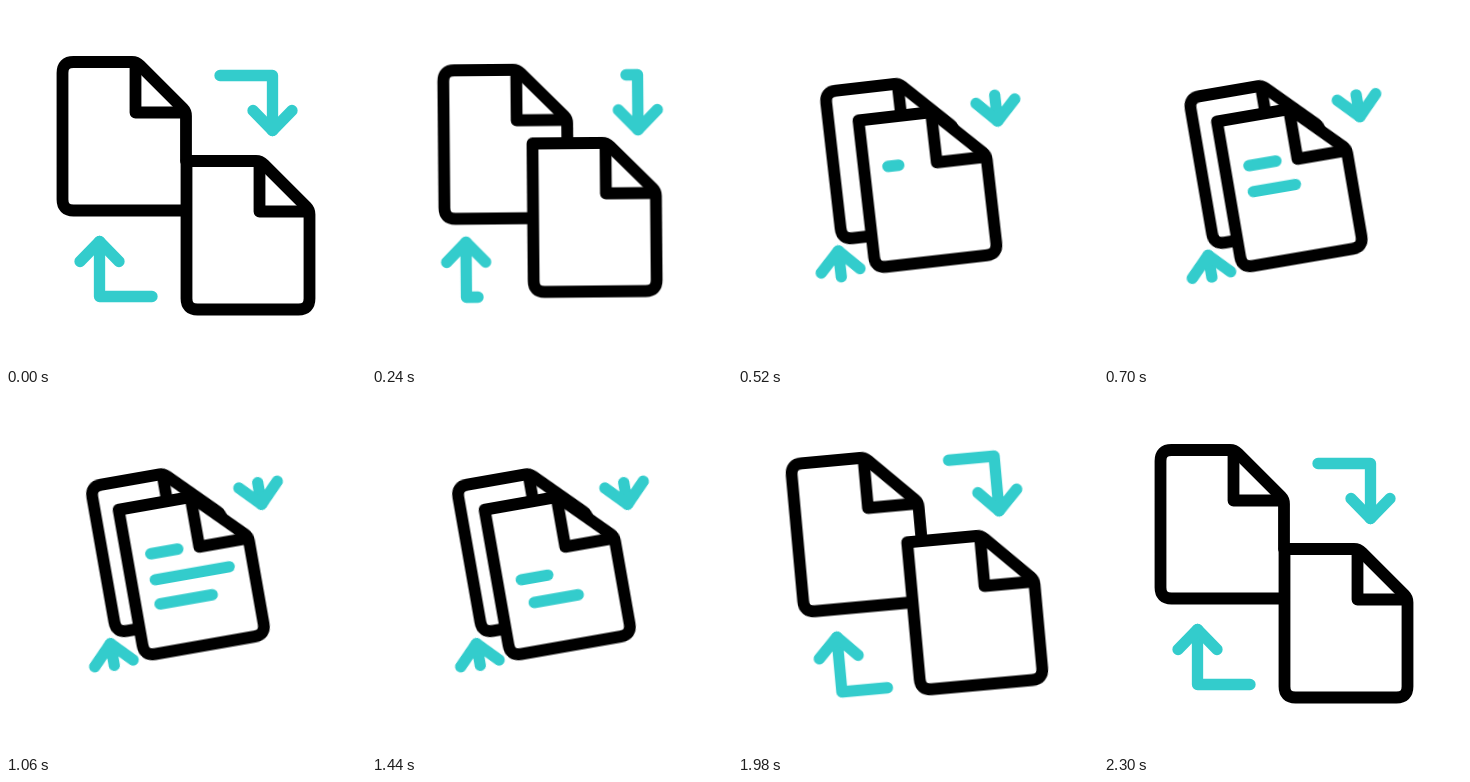
Animation, 360 px wide and 360 px high, one loop 2700 ms. Source, as an HTML page:

```html
<!DOCTYPE html>
<html lang="en">
<head>
<meta charset="utf-8">
<title>Swapping pages</title>
<style>
  html, body { margin: 0; width: 100%; height: 100%; overflow: hidden; background: #fff; }
  svg { display: block; width: 100%; height: 100%; }

  path { fill: none; stroke-linecap: round; stroke-linejoin: round; }
  .page path { stroke: #000; stroke-width: 11.8; }
  .page .sheet { fill: #fff; }
  .arrow path, .page .line { stroke: #33cccc; stroke-width: 11.3; }

  .scene, .page, .shaft, .line { animation: 2.7s infinite; }

  /* smoothstep for the tilt and the text lines, cubic out for the pages, quartic out for the shafts */
  .scene, .line { animation-timing-function: cubic-bezier(.3333, 0, .6667, 1); }
  .page { animation-timing-function: cubic-bezier(.3333, 1, .6667, 1); }
  .shaft { animation-timing-function: cubic-bezier(.165, .84, .44, 1); }

  .scene { transform-origin: 180px 180px; animation-name: tilt; }
  .back { --shift: translate(44.6px, 21.3px); animation-name: slide; }
  .front { --shift: translate(-55.7px, -50px); animation-name: slide; }
  .shaft { stroke-dasharray: 108 200; animation-name: retract; }
  .line { stroke-dasharray: 1 2; stroke-dashoffset: 1.01; }
  .l1 { animation-name: write1; }
  .l2 { animation-name: write2; }
  .l3 { animation-name: write3; }

  @keyframes tilt {
    0%, 5.926%, 85.185%, 100% { transform: rotate(0deg); }
    28.148%, 62.222% { transform: rotate(-10deg); }
  }
  @keyframes slide {
    0%, 5.926%, 85.185%, 100% { transform: translate(0, 0); }
    28.148%, 62.963% { transform: var(--shift); }
  }
  @keyframes retract {
    0%, 5.926%, 85.185%, 100% { stroke-dashoffset: 0; }
    28.148%, 61.481% { stroke-dashoffset: 86; }
  }
  @keyframes write1 {
    0%, 14.444%, 51.852%, 100% { stroke-dashoffset: 1.01; }
    25.556%, 39.259% { stroke-dashoffset: 0; }
  }
  @keyframes write2 {
    0%, 18.519%, 58.519%, 100% { stroke-dashoffset: 1.01; }
    32.074%, 45.926% { stroke-dashoffset: 0; }
  }
  @keyframes write3 {
    0%, 25.926%, 60%, 100% { stroke-dashoffset: 1.01; }
    40%, 51.111% { stroke-dashoffset: 0; }
  }
</style>
</head>
<body>
<svg viewBox="0 0 360 360">
  <g class="scene">
    <g class="page back">
      <path d="M180 155V110Q180 105.500 177 102.500L134 59.500Q130.500 56 126 56H67.500Q56.500 56 56.500 67V193.500Q56.500 204.500 67.500 204.500H180"/>
      <path d="M129.500 58V106.500H178"/>
    </g>

    <g class="page front">
      <path class="sheet" d="M180.500 155H250Q254.500 155 258 158.500L300.500 201Q303.500 204 303.500 208.500V292.500Q303.500 303.500 292.500 303.500H191.500Q180.500 303.500 180.500 292.500Z"/>
      <path d="M253.500 157V205.500H302"/>
      <path class="line l1" pathLength="1" d="M204.500 204H232"/>
      <path class="line l2" pathLength="1" d="M204.500 230.300H279.500"/>
      <path class="line l3" pathLength="1" d="M258 255H204.500"/>
    </g>

    <g class="arrow">
      <path class="shaft" d="M266.500 124.500V69.500H214"/>
      <path d="M247 104.500L266.500 124.500L286 104.500"/>
    </g>
    <g class="arrow" transform="rotate(180 180 180)">
      <path class="shaft" d="M266.500 124.500V69.500H214"/>
      <path d="M247 104.500L266.500 124.500L286 104.500"/>
    </g>
  </g>
</svg>
</body>
</html>
```
